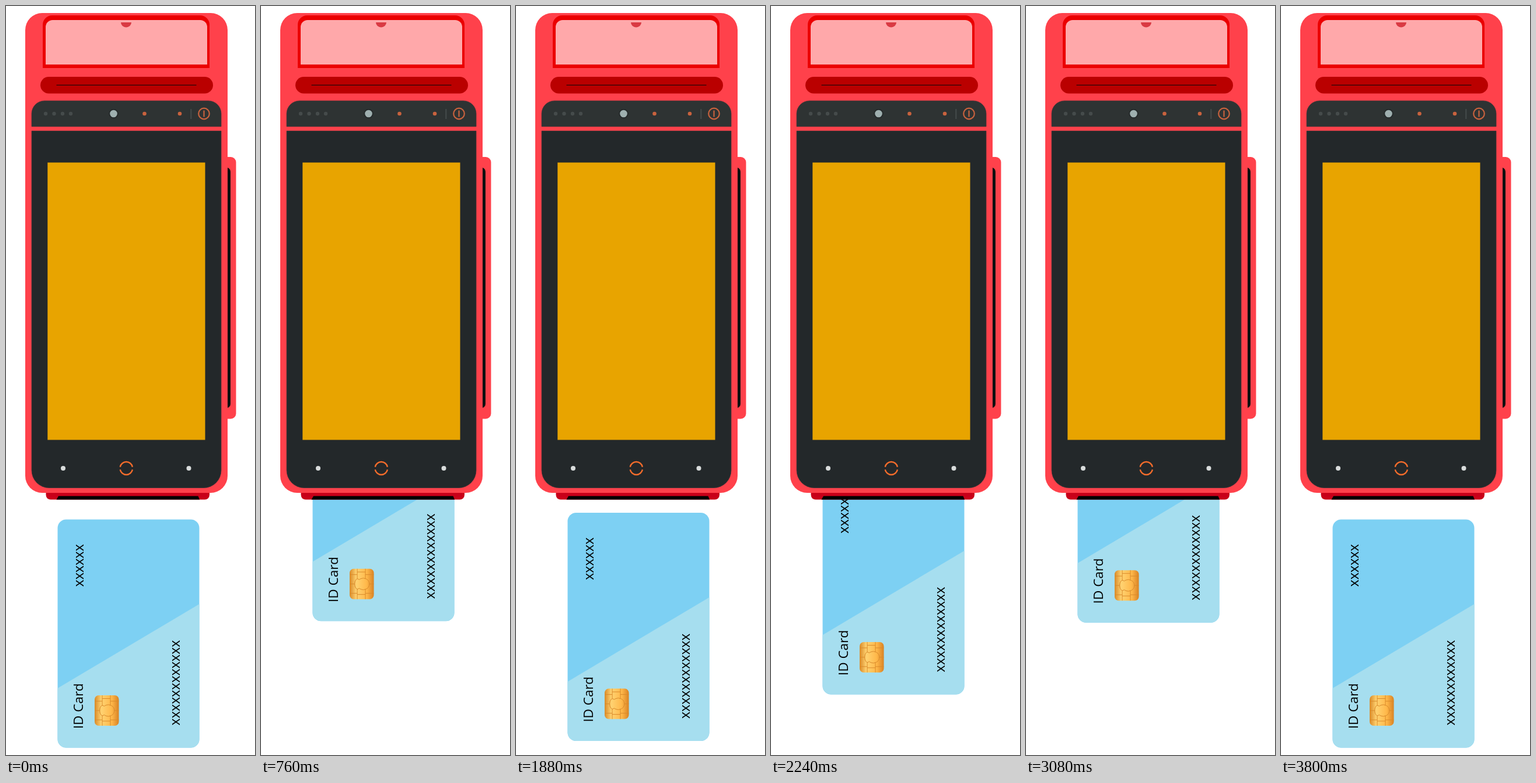
An HTML page for the animation above (3.84 s loop, 427x1280 px).

```html
<!DOCTYPE html>
<html lang="en">
<head>
<meta charset="utf-8">
<title>Card reader</title>
<style>
  html, body { margin: 0; width: 100%; height: 100%; overflow: hidden; background: #fff; }
  svg { display: block; width: 427px; height: 1280px; }
  text { font-family: "Open Sans", "Noto Sans", sans-serif; font-size: 23.2px; }
</style>
</head>
<body>
<svg viewBox="0 0 427 1280">
  <defs>
    <linearGradient id="gold">
      <stop offset="0" stop-color="#d98a28"/>
      <stop offset=".28" stop-color="#ffd271"/>
      <stop offset=".7" stop-color="#ffb84a"/>
      <stop offset="1" stop-color="#d98324"/>
    </linearGradient>
    <clipPath id="cardShape"><rect x="88.5" y="877.5" width="243" height="390" rx="14.5"/></clipPath>
    <clipPath id="below"><rect y="843" width="427" height="437"/></clipPath>
  </defs>

  <g clip-path="url(#below)">
    <g id="card">
      <g clip-path="url(#cardShape)">
        <path fill="#7dd0f3" d="M88 877h244v391H88z"/>
        <path fill="#a6deef" d="M88 1166.3L332 1021.7V1268H88z"/>
      </g>
      <text transform="translate(132 1235.2) rotate(-90)" style="font-size:22.5px">ID Card</text>
      <text transform="translate(132.5 992.5) rotate(-90)">xxxxxx</text>
      <text transform="translate(298 1229.5) rotate(-90)">xxxxxxxxxxxx</text>
      <rect x="152" y="1178" width="41.5" height="52" rx="7" fill="url(#gold)"/>
      <path fill="none" stroke="#d98a2b" d="M152 1188h13M179 1188h14.500M152 1220h13M179 1220h14.500M152 1204h8M186 1204h7.500
        M165 1178v17M179 1178v17M165 1213v17M179 1213v17M165 1183.500h14M165 1222h14
        M165 1195c-6 3-6 15 0 18q4-3 6 0 5 2 8 0c9-2 9-16 0-18q-3-2-8 0-2 3-6 0"/>
    </g>
  </g>

  <path fill="#c80019" d="M68.500 825h280.500v10.500a8 8 0 0 1-8 8H76.500a8 8 0 0 1-8-8z"/>
  <path d="M90 837.500h239.500l2.500 6H86.500z"/>
  <rect x="370" y="258" width="24.500" height="447.500" rx="9" fill="#ff414b"/>
  <rect x="370" y="276" width="15" height="411" rx="7" fill="#0b0f10"/>
  <rect x="33" y="12" width="347" height="820" rx="29" fill="#ff414b"/>

  <path fill="#eb0000" d="M63 106V32a16 16 0 0 1 16-16h254a16 16 0 0 1 16 16v74z"/>
  <path fill="#ffa8aa" d="M68 100V36a12 12 0 0 1 12-12h253a12 12 0 0 1 12 12v64z"/>
  <path fill="#d93a43" d="M197 28h18a9 8.500 0 0 1-18 0z"/>
  <rect x="59" y="121" width="296" height="28.500" rx="14.250" fill="#ba0000"/>
  <path stroke="#400507" stroke-width="1.500" d="M86.500 135.300h240"/>

  <path fill="#2e3333" stroke="#4a3437" stroke-width=".8" d="M44 206v-22a22 22 0 0 1 22-22h281a22 22 0 0 1 22 22v22z"/>
  <g fill="#454b4b">
    <circle cx="68" cy="184" r="3.200"/><circle cx="82.500" cy="184" r="3.200"/>
    <circle cx="97" cy="184" r="3.200"/><circle cx="111" cy="184" r="3.200"/>
    <path d="M316.300 176h2v17h-2z"/>
  </g>
  <circle cx="184.500" cy="184" r="7.300" fill="#9fb0b0" stroke="#252a2b" stroke-width="2"/>
  <g fill="#c8623e">
    <circle cx="237.500" cy="184" r="3.300"/><circle cx="298" cy="184" r="3.300"/>
  </g>
  <g fill="none" stroke="#c8623e" stroke-width="2.200">
    <circle cx="339.500" cy="184" r="9.300"/><path d="M339.500 178.500v11"/>
  </g>

  <path fill="#23282a" stroke="#4a3437" stroke-width=".8" d="M44 213.500h325V793.500a30 30 0 0 1-30 30H74a30 30 0 0 1-30-30z"/>
  <path fill="#e8a400" d="M71.300 267.500h270.200v474H71.300z"/>
  <g fill="#d9dcdc">
    <circle cx="98" cy="790" r="4"/><circle cx="313.500" cy="790" r="4"/>
  </g>
  <path fill="none" stroke="#f36c2b" stroke-width="2.400" d="M195.700 787.800a10.800 10.800 0 0 1 21.200 0M195.700 792.200a10.800 10.800 0 0 0 21.200 0"/>
</svg>
<script>
  const LOOP = 3840, STEP = 40, TRAVEL = 273.2;
  const card = document.getElementById("card");

  // Two strokes in and out; the last one is a little quicker.
  function depth(t) {
    if (t <= 1920) return 1 - Math.abs(t - 960) / 960;
    if (t <= 2880) return (t - 1920) / 960;
    return Math.max(0, (3800 - t) / 920);
  }

  function draw(now) {
    const t = Math.floor(now / STEP + 0.2) * STEP % LOOP;
    card.setAttribute("transform", `translate(0 ${-TRAVEL * depth(t)})`);
    requestAnimationFrame(draw);
  }
  draw(0);
</script>
</body>
</html>
```
